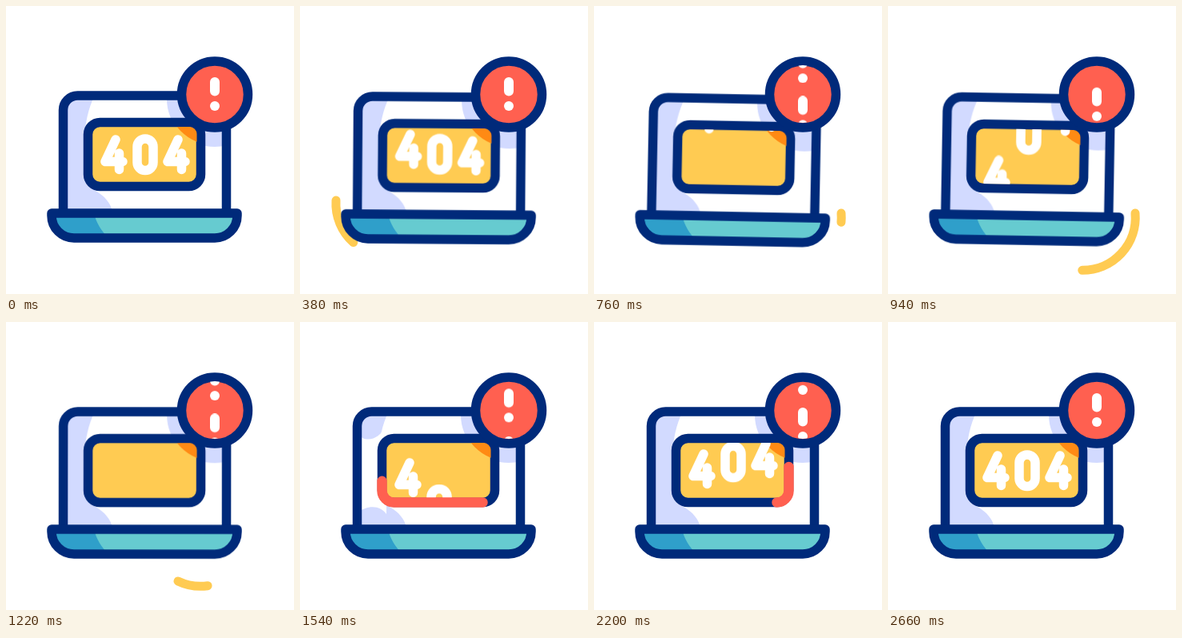
These frames come from a looping animation (360x360 px, 2760 ms). An HTML page:

```html
<!DOCTYPE html>
<html lang="en">
<head>
<meta charset="utf-8">
<title>404 error</title>
<style>
  html, body { margin: 0; width: 100%; height: 100%; overflow: hidden; background: #fff; }
  svg { display: block; width: 100vw; height: 100vh; }

  .line { fill: none; stroke: #002a7a; stroke-width: 11.5; stroke-linejoin: round; }
  .swoosh { fill: none; stroke: #ffcb52; stroke-width: 11; stroke-linecap: round; }
  .alert { fill: none; stroke: #ff6050; stroke-width: 12.5; stroke-linecap: round; }
  .digit { fill: none; stroke: #fff; stroke-width: 11.5; stroke-linecap: round; stroke-linejoin: round; }
  .shade { fill: #d2daff; }

  .laptop, .digit, .mark, .swoosh, .alert, .gap {
    animation: 2760ms linear infinite both;
  }
  .laptop { animation-name: sway; transform-origin: 173px 275px; animation-timing-function: ease-in-out; }
  .digit { animation-name: roll; animation-delay: calc(var(--i) * 80ms); }
  .left { animation-name: sweep-left; }
  .right { animation-name: sweep-right; }
  .alert { animation-name: trace; }
  .gap { animation-name: part; }
  .out { animation-name: leave; }
  .in { animation-name: arrive; }

  @keyframes sway {
    0%, 7.25%, 46.4%, 100% { transform: translateY(0) rotate(0deg); }
    21.74% { transform: translateY(4px) rotate(1deg); }
    27.54% { transform: translateY(4px) rotate(1.1deg); }
    34.06% { transform: translateY(3px) rotate(1deg); }
  }

  @keyframes roll {
    0%, 7.25% { transform: translateY(0); }
    12.3% { transform: translateY(-3px); }
    15.94% { transform: translateY(-15px); }
    18.84% { transform: translateY(-46px); }
    21.74% { transform: translateY(-58px); }
    25% { transform: translateY(-63px); }
    28.26% { transform: translateY(-52px); }
    31.16% { transform: translateY(-29px); }
    34.06% { transform: translateY(23px); }
    36.96%, 50% { transform: translateY(64px); }
    52.9% { transform: translateY(43px); }
    55.8% { transform: translateY(9px); }
    58.7% { transform: translateY(-2px); }
    61.6% { transform: translateY(-9px); }
    64.5% { transform: translateY(-14px); }
    67.4% { transform: translateY(-21px); }
    70.29% { transform: translateY(-19px); }
    73.9% { transform: translateY(-15px); }
    76.8% { transform: translateY(-11px); }
    79.7% { transform: translateY(-2px); }
    83.3%, 100% { transform: translateY(0); }
  }

  @keyframes sweep-left {
    0%, 8.69% { opacity: 0; stroke-dasharray: 0 200; stroke-dashoffset: 0; }
    8.7% { opacity: 1; stroke-dasharray: 0 200; stroke-dashoffset: 0; }
    20.3% { opacity: 1; stroke-dasharray: 100 200; stroke-dashoffset: 0; }
    21.74% { opacity: 1; stroke-dasharray: 92 200; stroke-dashoffset: -8; }
    26.08% { opacity: 1; stroke-dasharray: 0 200; stroke-dashoffset: -100; }
    26.09%, 100% { opacity: 0; stroke-dasharray: 0 200; stroke-dashoffset: -100; }
  }

  @keyframes sweep-right {
    0%, 26.8% { opacity: 0; stroke-dasharray: 0 200; stroke-dashoffset: 0; }
    26.81% { opacity: 1; stroke-dasharray: 0 200; stroke-dashoffset: 0; }
    34.06% { opacity: 1; stroke-dasharray: 79 200; stroke-dashoffset: 0; }
    37.7% { opacity: 1; stroke-dasharray: 100 200; stroke-dashoffset: 0; }
    46.73% { opacity: 1; stroke-dasharray: 0 200; stroke-dashoffset: -100; }
    46.74%, 100% { opacity: 0; stroke-dasharray: 0 200; stroke-dashoffset: -100; }
  }

  @keyframes trace {
    0%, 47.09% { opacity: 0; stroke-dasharray: 0 200; stroke-dashoffset: 0; }
    47.1% { opacity: 1; stroke-dasharray: 0 200; stroke-dashoffset: 0; }
    55.8% { opacity: 1; stroke-dasharray: 35 200; stroke-dashoffset: 0; }
    70.29% { opacity: 1; stroke-dasharray: 94 200; stroke-dashoffset: 0; }
    72.1% { opacity: 1; stroke-dasharray: 98 200; stroke-dashoffset: -2; }
    79.7% { opacity: 1; stroke-dasharray: 13 200; stroke-dashoffset: -87; }
    81.88% { opacity: 1; stroke-dasharray: 0 200; stroke-dashoffset: -100; }
    81.89%, 100% { opacity: 0; stroke-dasharray: 0 200; stroke-dashoffset: -100; }
  }

  /* opening between the two halves of the screen shade */
  @keyframes part {
    0%, 46.37% { opacity: 0; d: path("M70 185C85 190 98 187 108 180V188C98 185 85 182 70 190Z"); }
    46.38% { opacity: 1; d: path("M70 185C85 190 98 187 108 180V188C98 185 85 182 70 190Z"); }
    54.3%, 56% { opacity: 1; d: path("M70 138C82 153 98 147 108 130V240C100 229 84 228 70 240Z"); }
    71% { opacity: 1; d: path("M70 138C82 153 98 147 108 130V233C100 222 84 218 70 233Z"); }
    78.98% { opacity: 1; d: path("M70 185C85 190 98 187 108 180V188C98 185 85 182 70 190Z"); }
    78.99%, 100% { opacity: 0; d: path("M70 185C85 190 98 187 108 180V188C98 185 85 182 70 190Z"); }
  }

  /* four equal rolls of the exclamation mark */
  @keyframes leave {
    0%, 20.65%, 37.68%, 54.71%, 71.74%, 88.77%, 100% { transform: translateY(0); }
    21.74%, 38.77%, 55.8%, 72.83% { transform: translateY(-5.5px); }
    28.62%, 45.65%, 62.68%, 79.71% { transform: translateY(-40px); }
    34.06%, 51.09%, 68.12%, 85.15% { transform: translateY(-62px); }
    37.65%, 54.68%, 71.71%, 88.74% { transform: translateY(-62px); }
  }
  @keyframes arrive {
    0%, 20.65%, 37.68%, 54.71%, 71.74%, 88.77%, 100% { transform: translateY(62px); }
    21.74%, 38.77%, 55.8%, 72.83% { transform: translateY(54px); }
    28.62%, 45.65%, 62.68%, 79.71% { transform: translateY(18px); }
    34.06%, 51.09%, 68.12%, 85.15% { transform: translateY(13px); }
    36.23%, 53.26%, 70.29%, 87.32% { transform: translateY(-1px); }
    37.65%, 54.68%, 71.71%, 88.74% { transform: translateY(0); }
  }
</style>
</head>
<body>
<svg viewBox="0 0 360 360" role="img" aria-label="404 error">
  <defs>
    <path id="screen" d="M71.5 259V130a18 18 0 0 1 18-18H257.5a18 18 0 0 1 18 18V259"/>
    <path id="base" d="M57 259H289v3a28 28 0 0 1-28 28H85a28 28 0 0 1-28-28Z"/>
    <path id="four" d="M137 167L124 194.500H146M141.500 184V204.500"/>
    <g id="mark" fill="#fff">
      <rect x="255" y="89" width="12" height="23.500" rx="6"/>
      <circle cx="261" cy="125" r="6"/>
    </g>
    <clipPath id="in-screen"><use href="#screen"/></clipPath>
    <clipPath id="in-base"><use href="#base"/></clipPath>
    <clipPath id="in-popup"><rect x="108" y="151" width="130.500" height="69" rx="9"/></clipPath>
    <clipPath id="in-badge"><circle cx="261" cy="110" r="36"/></clipPath>
  </defs>

  <path class="swoosh left" pathLength="100" d="M45 243A65 65 0 0 0 137 306"/>
  <path class="swoosh right" pathLength="100" d="M309 259A66 66 0 0 1 215 324"/>

  <g class="laptop">
    <use href="#screen" fill="#fff"/>
    <g clip-path="url(#in-screen)">
      <path class="shade" d="M70 110H110L108 118C94 150 92 215 112 231C124 238 130 246 133 256V260H70Z"/>
      <path class="gap" fill="#fff" d="M70 185C85 190 98 187 108 180V188C98 185 85 182 70 190Z"/>
      <circle class="shade" cx="261" cy="116" r="60"/>
    </g>
    <use href="#screen" class="line"/>

    <use href="#base" fill="#66cbd0"/>
    <path clip-path="url(#in-base)" fill="#2f9fca" d="M57 259H110C113 272 120 282 129 291H57Z"/>
    <use href="#base" class="line"/>

    <rect class="line" x="102.500" y="145.500" width="141" height="80" rx="15" style="fill:#ffcb52"/>
    <g clip-path="url(#in-popup)">
      <circle cx="261" cy="114" r="60" fill="#ff8a14"/>
      <g class="digit" style="--i:0"><use href="#four"/></g>
      <g class="digit" style="--i:1"><rect x="164" y="166" width="20" height="39.500" rx="10"/></g>
      <g class="digit" style="--i:2"><use href="#four" x="78"/></g>
    </g>
    <path class="alert" pathLength="100"
      d="M228.500 225.500H117.500a15 15 0 0 1-15-15V160.500a15 15 0 0 1 15-15H228.500a15 15 0 0 1 15 15V210.500a15 15 0 0 1-15 15"/>
  </g>

  <circle class="line" cx="261" cy="110.500" r="41.500" style="fill:#ff6050"/>
  <g clip-path="url(#in-badge)">
    <g class="mark out"><use href="#mark"/></g>
    <g class="mark in"><use href="#mark"/></g>
  </g>
</svg>
</body>
</html>
```
